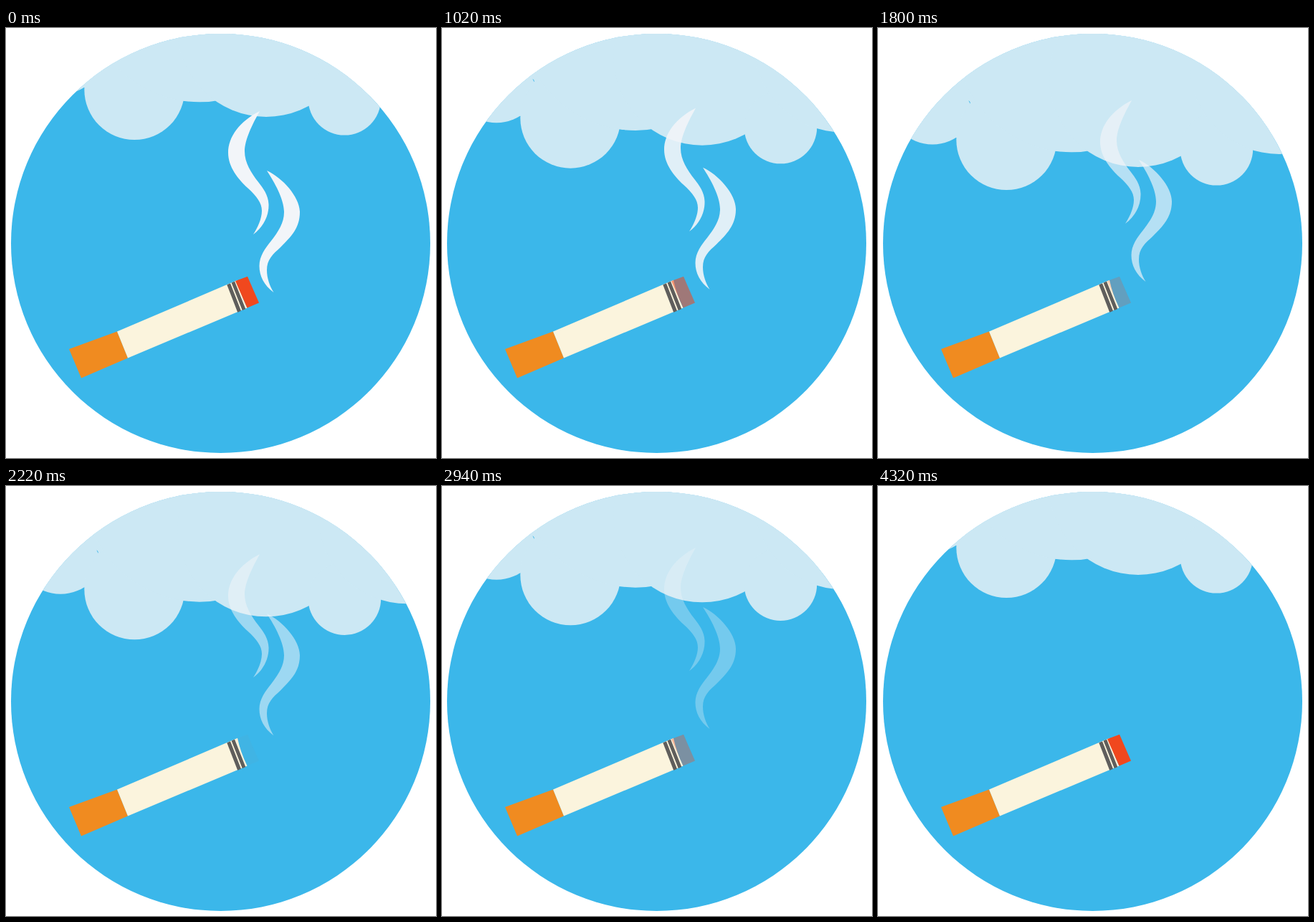
Animation of 600 by 600 pixels, one loop 4380 ms. Source, as an HTML page:

```html
<!DOCTYPE html>
<html lang="en">
<head>
<meta charset="utf-8">
<title>Smoke</title>
<style>
  html, body { margin: 0; width: 100%; height: 100%; overflow: hidden; background: #fff; }
  svg { display: block; width: 100vw; height: 100vh; }
</style>
</head>
<body>
<svg viewBox="0 0 600 600">
  <defs>
    <clipPath id="disc"><circle cx="299.5" cy="300.5" r="292.5"/></clipPath>
  </defs>
  <circle cx="299.5" cy="300.5" r="292.5" fill="#3bb7ea"/>
  <g clip-path="url(#disc)">
    <g id="cloud" fill="#cce8f4">
      <rect y="-100" width="600" height="183"/>
      <circle cx="76" cy="30.5" r="62"/>
      <circle cx="179.3" cy="86" r="70"/>
      <circle cx="270" cy="-58.7" r="162"/>
      <circle cx="363" cy="0" r="124"/>
      <circle cx="472.4" cy="98.8" r="50.8"/>
      <circle cx="560" cy="-19" r="125"/>
      <path d="M126.3 31q2.5 1 2.7 4.5q-1.2-.5-1.5-2z" fill="#3bb7ea"/>
    </g>
  </g>
  <path d="M88 448L155 423.5L170 460.5L105 488.5Z" fill="#f08b20"/>
  <path d="M155 423.5L323 351.8Q327 371 336.5 390.5L170 460.5Z" fill="#fbf4dd"/>
  <path d="M308.3 358.3L313 356.2L328 394.8L323.2 396.8ZM314.6 355.5L319 353.6L334.3 392L329.8 394Z" fill="#5f5e5c"/>
  <path id="ember" d="M320 353L337 346.8L353 383.5L336.5 390.5Z" fill="#f0481e"/>
  <g id="smoke" fill="#f2f5f9">
    <path d="M354 116C326 130 310 152 310 174C310 194 324 211 337 223C350 235 357 244 357 255C357 266 351 279 345 288C359 278 367 262 366.5 246C366 233 359 224 352.5 215.5C342 202 333 188 333 172C333 156 344 134 354 116Z"/>
    <path d="M364 199C386 209 410 236 410 257C410 279 398 291 383 306C372 316 364 323 364 338C364 349 368 360 373.5 369C360 359 353.5 346 353.5 332C353.5 318 362 307 370 297C380 284 388 272 388 257C388 239 375 216 364 199Z"/>
  </g>
</svg>
<script>
  const LOOP = 4380, STEP = 60;
  const [cloud, ember, smoke] = ['cloud', 'ember', 'smoke'].map(id => document.getElementById(id));

  // Linear progress from 0 to 1 between two times
  const ramp = (t, from, to) => Math.min(1, Math.max(0, (t - from) / (to - from)));

  function draw(now) {
    const t = Math.floor(now % LOOP / STEP) * STEP;
    const drop = 70 * (ramp(t, 0, 1800) - ramp(t, 1800, 4320));
    cloud.setAttribute('transform', `translate(0 ${drop})`);
    ember.setAttribute('opacity', 1 - ramp(t, 0, 2280) + ramp(t, 2280, 4140));
    smoke.setAttribute('transform', `translate(0 ${-30 * ramp(t, 720, 2880)})`);
    smoke.setAttribute('opacity', 1 - ramp(t, 720, 3960));
  }

  const start = performance.now();
  function tick() {
    draw(performance.now() - start);
    requestAnimationFrame(tick);
  }
  tick();
</script>
</body>
</html>
```
